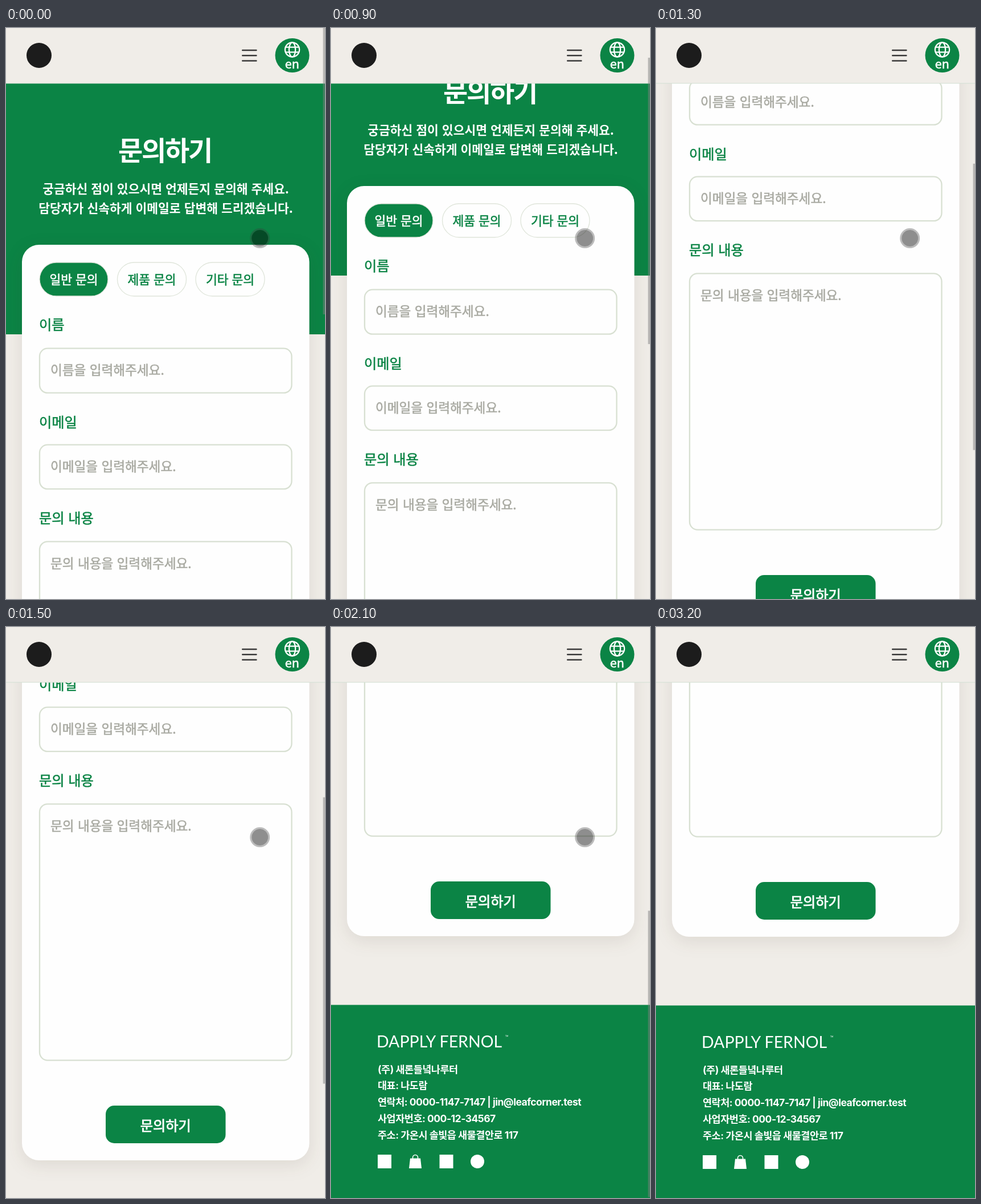
Write an HTML page that moves like this. It is 560x1001 px and loops after 3300 ms.

```html
<!DOCTYPE html>
<html lang="ko">
<head>
<meta charset="utf-8">
<title>문의하기</title>
<style>
  html, body { margin: 0; width: 100%; height: 100%; overflow: hidden; background: #f0ede8; }
  svg { display: block; width: 560px; height: 1001px; }
  text { font-family: "Noto Sans CJK KR", "Noto Sans CJK", sans-serif; }
  .mid { text-anchor: middle; }
  .medium { stroke-width: .6px; }
  .green { fill: #0b8445; stroke: #0b8445; }
  .white { fill: #fff; stroke: #fff; }
  .title { font-size: 47px; font-weight: 700; letter-spacing: -2.3px; fill: #fff; }
  .lead { font-size: 21.5px; font-weight: 700; fill: #fff; }
  .pill { font-size: 21.5px; }
  .label { font-size: 24.2px; }
  .send { font-size: 24.2px; stroke-width: .9px; }
  .hint { font-size: 22.6px; fill: #a9aaa2; stroke: #a9aaa2; }
  .field { fill: #fefefe; stroke: #d8e0d2; stroke-width: 2.3px; }
  .info { font: 700 17.5px Inter, "Noto Sans CJK KR", "Noto Sans CJK", sans-serif; letter-spacing: -.5px; fill: #fff; }
  .brand { font: 400 28.5px Lato, sans-serif; fill: #fff; }
  .card { filter: drop-shadow(0 8px 15px rgba(60, 40, 20, .1)); }
</style>
</head>
<body>
<svg viewBox="0 0 560 1001">
  <g id="page">
    <rect width="560" height="537" fill="#0b8445"/>
    <text class="title mid" x="279" y="232">문의하기</text>
    <text class="lead mid" x="280.5" y="290">궁금하신 점이 있으시면 언제든지 문의해 주세요.</text>
    <text class="lead mid" x="280.5" y="324">담당자가 신속하게 이메일로 답변해 드리겠습니다.</text>
    <rect class="card" x="28" y="380" width="504.5" height="1145" rx="30" fill="#fefefe"/>
    <g id="form"></g>
    <rect x="175" y="1429" width="210.5" height="66" rx="15" fill="#0b8445"/>
    <text class="send white mid" x="280.3" y="1472.5">문의하기</text>
    <rect y="1645.5" width="560" height="360" fill="#0b8445"/>
    <text class="brand" x="80" y="1719.5">DAPPLY FERNOL</text>
    <text x="306" y="1704" font-size="7" fill="#fff">™</text>
    <g id="info"></g>
    <g fill="#fff">
      <rect x="82" y="1908" width="24" height="24"/>
      <path d="M139 1914.5h18l2 17.5h-22z"/>
      <path d="M143.5 1918v-5a4.5 4.5 0 0 1 9 0v5" fill="none" stroke="#fff" stroke-width="1.6"/>
      <rect x="190.5" y="1908" width="24" height="24"/>
      <circle cx="257" cy="1920" r="12"/>
    </g>
  </g>

  <rect width="560" height="97.5" fill="#f0ede8"/>
  <rect y="96.3" width="560" height="1.4" fill="#0b8445" opacity=".09"/>
  <circle cx="58" cy="48" r="22" fill="#1c1c1c"/>
  <path d="M415.2 39h24.2M415.2 48.2h24.2M415.2 57.5h24.2" stroke="#3a3a3a" stroke-width="2.5" stroke-linecap="round"/>
  <circle cx="502.5" cy="48" r="30" fill="#0b8445"/>
  <g fill="none" stroke="#fff" stroke-width="2.3">
    <circle cx="502.5" cy="38" r="12.6"/>
    <ellipse cx="502.5" cy="38" rx="5.6" ry="12.6"/>
    <path d="M491 33.6h23M491 42.4h23"/>
  </g>
  <text class="pill medium white mid" x="502.3" y="71">en</text>

  <rect id="bar" x="556.5" width="3.5" height="502" fill="#808080" fill-opacity=".5"/>
  <g id="touch">
    <circle cx="445.7" cy="368.6" r="14.5" fill="#000" fill-opacity=".44"/>
    <circle cx="445.7" cy="368.6" r="16" fill="none" stroke="#3c3c3c" stroke-opacity=".34" stroke-width="3"/>
  </g>
</svg>
<script>
  const $ = id => document.getElementById(id);

  const pills = [[59, 120, '일반 문의'], [195.5, 121, '제품 문의'], [333, 121, '기타 문의']];
  const fields = [
    [529, 561.7, 78, '이름', '이름을 입력해주세요.'],
    [700, 730.7, 77.5, '이메일', '이메일을 입력해주세요.'],
    [868, 900.3, 449.3, '문의 내용', '문의 내용을 입력해주세요.']
  ];
  const lines = [
    '(주) 새론들녘나루터',
    '대표: 나도람',
    '연락처: 0000-1147-7147 | jin@leafcorner.test',
    '사업자번호: 000-12-34567',
    '주소: 가온시 솔빛읍 새물결안로 117'
  ];

  $('form').innerHTML = pills.map(([x, w, name], i) => `
    <rect x="${x}" y="411" width="${w}" height="59" rx="29.5"
      fill="${i ? '#fefefe' : '#0b8445'}" stroke="#dfe5da" stroke-width="1.3"/>
    <text class="pill medium mid ${i ? 'green' : 'white'}" x="${x + w / 2}" y="449">${name}</text>`).join('') +
    fields.map(([base, y, h, name, hint]) => `
    <text class="label medium green" x="58" y="${base}">${name}</text>
    <rect class="field" x="59" y="${y}" width="442.5" height="${h}" rx="14"/>
    <text class="hint medium" x="78" y="${y + 46.3}">${hint}</text>`).join('');

  $('info').innerHTML = lines.map((line, i) =>
    `<text class="info" x="82" y="${1764.5 + i * 28.8}">${line}</text>`).join('');

  const LOOP = 3300, STEP = 100, START = 700;
  // Scroll offset at each step from START on; the last one holds.
  const scroll = [0, 35, 103, 200, 300, 392, 470, 535, 590, 640, 690, 741, 825, 915, 983, 983, 983, 983, 982];

  function draw() {
    const t = Math.floor(performance.now() % LOOP / STEP) * STEP;
    const i = Math.max(0, (t - START) / STEP);
    const y = scroll[Math.min(i, scroll.length - 1)];
    $('page').setAttribute('transform', `translate(0 ${-y})`);
    $('bar').setAttribute('y', y * .506);
    $('bar').setAttribute('opacity', Math.max(0, Math.min(1, (3200 - t) / 300)));
    $('touch').setAttribute('visibility', t < 3100 ? 'visible' : 'hidden');
    requestAnimationFrame(draw);
  }
  draw();
</script>
</body>
</html>
```
